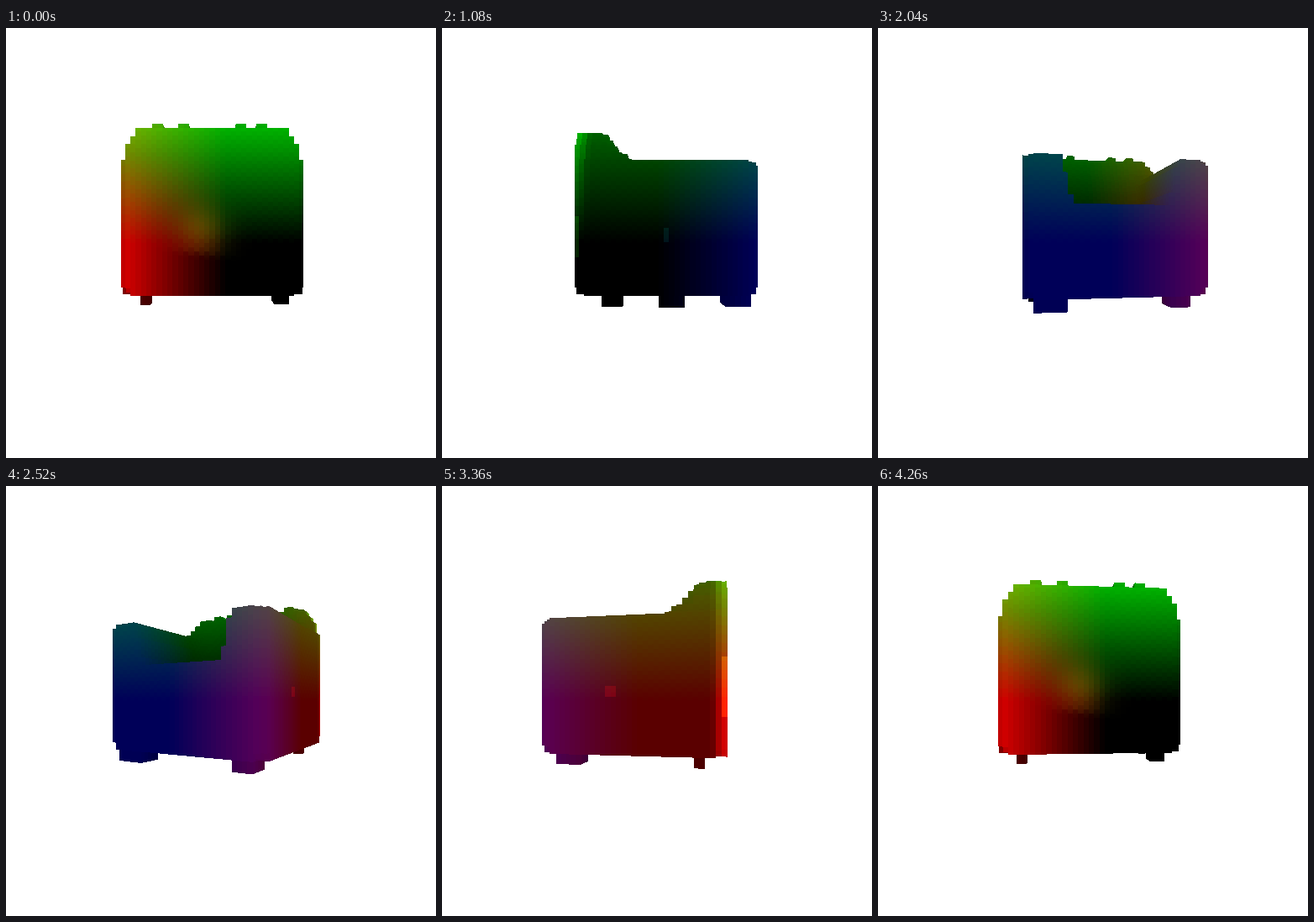
An HTML page with a canvas for the animation above (4320 ms loop, 512 px wide and 512 px high).

```html
<!DOCTYPE html>
<html lang="en">
<head>
<meta charset="utf-8">
<title>Turning voxel armchair</title>
<style>
html, body { margin: 0; width: 100%; height: 100%; overflow: hidden; background: #fff; }
canvas { display: block; width: 512px; height: 512px; }
</style>
</head>
<body>
<canvas id="stage" width="512" height="512"></canvas>
<script>
const SIZE = 512, MID = 256, CAM = 430;
const STEP_MS = 60, STEPS = 72;
const ctx = document.getElementById('stage').getContext('2d');
const image = ctx.createImageData(SIZE, SIZE);
const pixels = new Uint32Array(image.data.buffer);
const depth = new Float32Array(SIZE * SIZE);

// Plan view: x to the right, z towards the viewer at angle 0.
const N = 35, WIDTH = 179, CELL = WIDTH / N;
const LEFT = -98, RIGHT = LEFT + WIDTH, BACK = -98.5, FRONT = BACK + WIDTH;
const corners = [[LEFT, FRONT], [RIGHT, FRONT], [RIGHT, BACK], [LEFT, BACK]];
// Feet: x, z, half width, half depth
const feet = [[-77, 56, 6, 6], [62, 44, 9, 9], [65, -13, 10, 13], [56, -80, 17, 14], [-74, -75, 11, 11]];
const knobs = [-61, -38, 19, 38];

const clamp = (v, a, b) => Math.min(b, Math.max(a, v));
const ramp = (v, a, b) => clamp((v - a) / (b - a), 0, 1);
const smooth = (v, a, b) => { const t = ramp(v, a, b); return t * t * (3 - 2 * t); };
const snap = (v, s) => Math.round(v / s) * s;
const cornerGap = (x, z) => Math.min(...corners.map(c => Math.hypot(x - c[0], z - c[1])));

function topAt(x, z) {
  const side = 80 - 12 * (1 - ramp(cornerGap(x, z), 0, 16)) ** 2;
  const seat = 36 + 44 * Math.max(ramp(x, 36, 47), ramp(-x, 57, 66));
  const base = Math.min(side, seat);
  if (z < 25) return snap(base, 4);
  const edge = Math.min(x - LEFT, RIGHT - x);
  const back = Math.max(72, 111 - 40 * (1 - ramp(edge, 0, 24)) ** 2.2);
  // A few single blocks stand out on the upper edge.
  const knob = z > 60 && z < 76 && knobs.some(k => Math.abs(x - k) < CELL) ? 6 : 0;
  return snap(base + (back - base) * ramp(z, 25, 55), 7.4) + knob;
}

function bottomAt(x, z) {
  for (const [fx, fz, w, d] of feet)
    if (Math.abs(x - fx) <= w && Math.abs(z - fz) <= d) return -63.5;
  return -51 + 22 * (1 - ramp(cornerGap(x, z), 0, 12));
}

function buildWalls() {
  const cells = new Map(), walls = [];
  for (let i = 0; i < N; i++)
    for (let j = 0; j < N; j++) {
      const x = LEFT + (i + 0.5) * CELL, z = BACK + (j + 0.5) * CELL;
      if (cornerGap(x, z) > CELL) cells.set(i + ',' + j, { x, z, top: topAt(x, z), low: bottomAt(x, z) });
    }
  const h = CELL / 2;
  for (const [key, c] of cells) {
    const [i, j] = key.split(',').map(Number);
    for (const [nx, nz] of [[1, 0], [-1, 0], [0, 1], [0, -1]]) {
      const next = cells.get((i + nx) + ',' + (j + nz));
      const add = (low, top) => walls.push({
        x: c.x + nx * h, z: c.z + nz * h, nx, nz, low, top, row: (i + j) & 1
      });
      if (!next) add(c.low, c.top);
      else {
        if (c.top > next.top) add(next.top, c.top);
        if (c.low < next.low) add(c.low, next.low);
      }
    }
  }
  return walls;
}

// Colour follows the clamped position, stronger on the rear of the backrest.
function shade(wall, height) {
  const { x, z, nx, row } = wall;
  const block = (Math.floor(height / 8 + row / 2) + 0.5 - row / 2) * 8;
  const y = (height + block) / 2;
  const up = ramp(y, 0, 86), rear = smooth(z, 65, 79);
  let r = Math.max(0, -x + 5 * rear) * (0.92 + rear * (1.25 - 0.9 * up) - 0.08 * up);
  let g = Math.max(0, y) * (0.86 + 0.74 * rear);
  let b = Math.max(0, -z) * (0.9 - 0.15 * up);
  if (z > 70) {
    const slope = (x + 30) * 0.12;
    const below = smooth(y, -16 - slope, -4 - slope);
    const glow = 45 * below * Math.exp(-((x + 18) ** 2 + (y - 10) ** 2) / 600);
    r += glow;
    g += glow;
  }
  if (nx && z > 76 && y > -15 && y < (x < 0 ? 40 : 25)) {
    r += x < 0 ? 45 : 4;
    g += 35;
  }
  if (nx < 0 && x < -90 && Math.abs(z + 28) < 4 && Math.abs(height - 9) < 5) r += 35;
  if (nx > 0 && x > 78 && Math.abs(z + 8) < 3 && Math.abs(height - 8) < 7) { g += 20; b += 20; }
  return 0xff000000 | Math.min(255, b) << 16 | Math.min(255, g) << 8 | Math.min(255, r);
}

const walls = buildWalls();
const LOW = -70, HIGH = 130;
for (const w of walls) {
  w.colors = new Uint32Array(HIGH - LOW);
  for (let k = 0; k < w.colors.length; k++) w.colors[k] = shade(w, LOW + k + 0.5);
}

function drawWall(w, cos, sin) {
  const cx = w.x * cos - w.z * sin, cz = w.x * sin + w.z * cos;
  const nx = w.nx * cos - w.nz * sin, nz = w.nx * sin + w.nz * cos;
  if (nz * (CAM - cz) - nx * cx <= 0) return;
  // The wall runs at right angles to its normal.
  const hx = nz * CELL / 2, hz = -nx * CELL / 2;
  const wa = CAM / (CAM - cz + hz), wb = CAM / (CAM - cz - hz);
  const xa = MID + (cx - hx) * wa, xb = MID + (cx + hx) * wb;
  for (let px = Math.ceil(xa - 0.5); px < xb - 0.5; px++) {
    const scale = wa + (wb - wa) * (px + 0.5 - xa) / (xb - xa);
    const start = Math.ceil(MID - w.top * scale - 0.5);
    const end = MID - w.low * scale - 0.5;
    for (let py = start; py < end; py++) {
      const at = py * SIZE + px;
      if (scale <= depth[at]) continue;
      depth[at] = scale;
      pixels[at] = w.colors[Math.floor((MID - py - 0.5) / scale) - LOW];
    }
  }
}

let shown = -1;
function render(step) {
  const angle = step / STEPS * Math.PI * 2;
  const cos = Math.cos(angle), sin = Math.sin(angle);
  pixels.fill(0xffffffff);
  depth.fill(0);
  for (const w of walls) drawWall(w, cos, sin);
  ctx.putImageData(image, 0, 0);
}

const begin = performance.now();
function tick() {
  const step = Math.floor(Math.max(0, performance.now() - begin) / STEP_MS) % STEPS;
  if (step !== shown) render(shown = step);
  requestAnimationFrame(tick);
}
tick();
</script>
</body>
</html>
```
